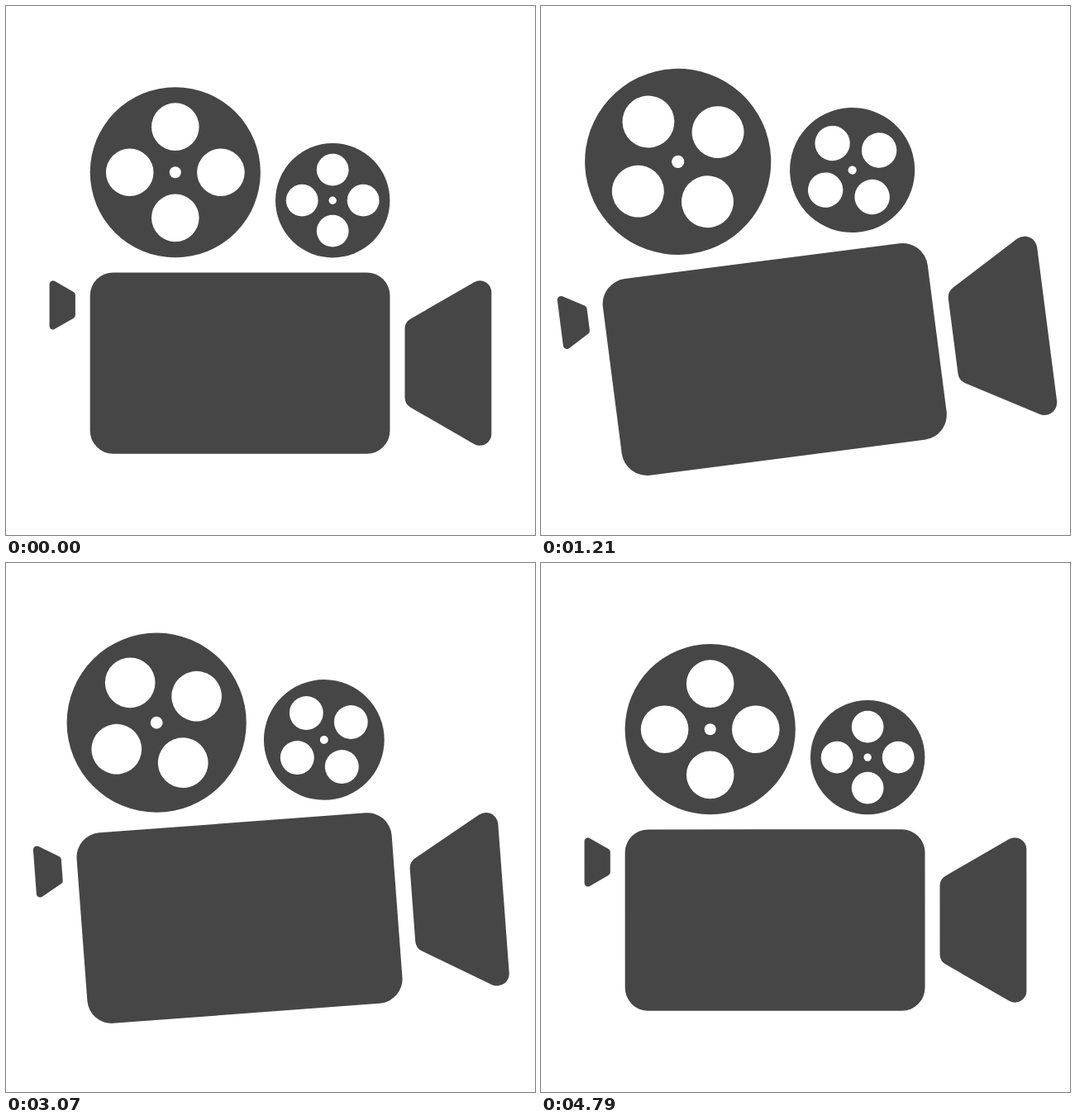
Animation, 640 px wide and 640 px high, one loop 5430 ms. Source, as an HTML page:

```html
<!DOCTYPE html>
<html lang="en">
<head>
<meta charset="utf-8">
<title>Film camera</title>
<style>
  html, body { margin: 0; width: 100%; height: 100%; overflow: hidden; background: #fff; }
  svg { display: block; width: 100%; height: 100%; }
</style>
</head>
<body>
<svg viewBox="0 0 640 640">
  <g id="camera" fill="#464646" stroke="#464646" stroke-width="0" stroke-linejoin="round">
    <rect x="101.7" y="322.4" width="362.8" height="219.4" rx="28"/>
    <path stroke-width="28" d="M573.3 346.3V517.8L496.5 473.5V390.6Z"/>
    <path stroke-width="8.4" d="M56.8 336.5V387.2L79.7 374V349.7Z"/>
  </g>
</svg>
<script>
const LOOP = 5430;
const STEP = LOOP / 76;
const TURN_OUT = 31;
const TURN_BACK = 2727;
const camera = document.getElementById('camera');

function add(parent, tag, attributes) {
  const node = document.createElementNS('http://www.w3.org/2000/svg', tag);
  for (const name in attributes) node.setAttribute(name, attributes[name]);
  return parent.appendChild(node);
}

function makeReel(x, y, radius, holeRadius, holeDistance, axleRadius) {
  const group = add(camera, 'g', {});
  const disc = (cx, cy, r, fill) => add(group, 'circle', { cx, cy, r, fill });
  disc(0, 0, radius, '#464646');
  disc(0, 0, axleRadius, '#fff');
  for (const [dx, dy] of [[0, -1], [1, 0], [0, 1], [-1, 0]]) {
    disc(dx * holeDistance, dy * holeDistance, holeRadius, '#fff');
  }
  return angle => group.setAttribute('transform', `translate(${x} ${y}) rotate(${angle})`);
}

const reels = [
  makeReel(204.8, 201.25, 103.1, 28.8, 55.1, 7),
  makeReel(395.2, 235.2, 69.2, 19.4, 37, 4.7)
];

function easeOut(time, start, duration, power) {
  const u = Math.min(1, Math.max(0, (time - start) / duration));
  return 1 - (1 - u) ** power;
}

function draw(time) {
  const out = easeOut(time, TURN_OUT, 2086, 3);
  const spinBack = easeOut(time, TURN_BACK, 2086, 3);
  const tilt = out - easeOut(time, TURN_BACK, 2920, 5);

  camera.setAttribute('transform',
    `translate(${320 - 14.1 * tilt} ${320 - 20.8 * tilt}) ` +
    `rotate(${-8 * tilt}) scale(${1 + 0.1 * tilt}) translate(-320 -320)`);
  for (const turn of reels) turn(360 * (out + spinBack));
}

const startTime = performance.now();

function tick() {
  // The small lead keeps rounded step times on the right side of each step.
  const elapsed = (performance.now() - startTime + 6) % LOOP;
  draw(Math.floor(elapsed / STEP) * STEP);
  requestAnimationFrame(tick);
}
tick();
</script>
</body>
</html>
```
